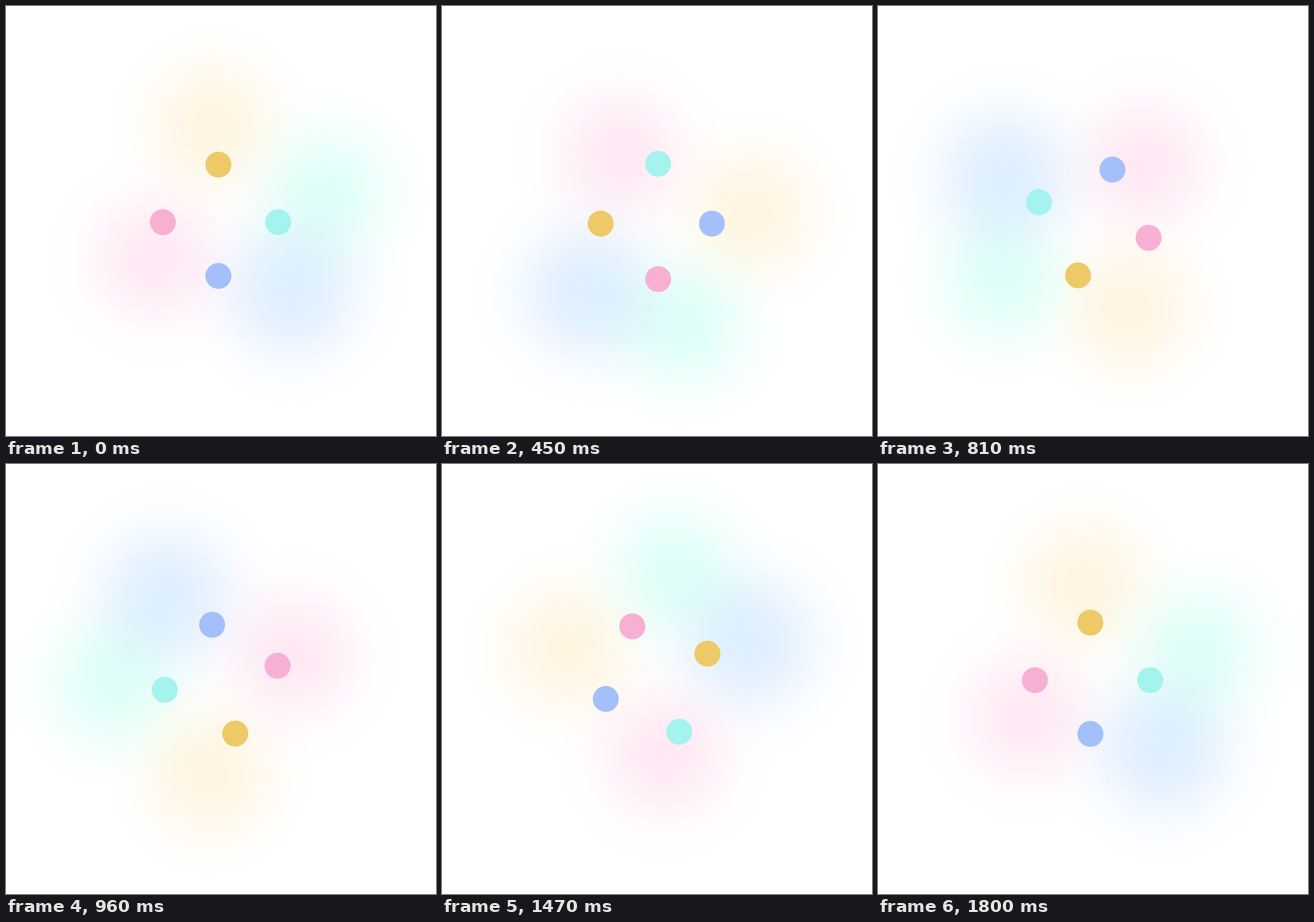
These frames come from a looping animation (744x744 px, 2.4 s). An HTML page with a canvas:

```html
<!DOCTYPE html>
<html lang="en">
<head>
<meta charset="utf-8">
<title>Orbiting dots</title>
<style>
  html, body { margin: 0; width: 100%; height: 100%; overflow: hidden; background: #fff; }
  canvas { display: block; width: 100vw; height: 100vh; }
</style>
</head>
<body>
<canvas width="744" height="744"></canvas>
<script>
const SIZE = 744, LOOP = 2400, TURN = 1800, STEP = 30, REACH = 280;
const ctx = document.querySelector('canvas').getContext('2d');

// Positions are relative to the stage centre.
const glows = [
  { x: -15, y: -165, spread: 108, tint: [255, 245, 225] },
  { x: -114, y: 65, spread: 107, tint: [255, 233, 244] },
  { x: 182, y: -49, spread: 111, tint: [225, 255, 248] },
  { x: 122, y: 122, spread: 115, tint: [224, 239, 255] }
];
const dots = [
  { x: -4.5, y: -97.5, color: '#edc967' },
  { x: 99, y: 2, color: '#a4f3ee' },
  { x: -4.5, y: 95, color: '#a4c0fa' },
  { x: -100.5, y: 2, color: '#f7b0d4' }
];

// A soft bell-shaped fade from the tint to white.
function softGlow({ x, y, spread, tint }) {
  const fill = ctx.createRadialGradient(x, y, 0, x, y, REACH);
  const stops = 28;
  for (let i = 0; i <= stops; i++) {
    const k = i < stops ? Math.exp(-((i / stops * REACH / spread) ** 2.4)) : 0;
    const rgb = tint.map(c => 255 - (255 - c) * k);
    fill.addColorStop(i / stops, `rgb(${rgb})`);
  }
  return fill;
}
const fills = glows.map(softGlow);

function rotated(angle, paint) {
  ctx.save();
  ctx.translate(SIZE / 2, SIZE / 2);
  ctx.rotate(angle);
  paint();
  ctx.restore();
}

function draw(time) {
  const t = Math.min(time % LOOP, TURN);
  const angle = Math.floor(t / STEP) * STEP / TURN * 2 * Math.PI;

  ctx.fillStyle = '#fff';
  ctx.fillRect(0, 0, SIZE, SIZE);

  rotated(angle, () => {
    ctx.globalCompositeOperation = 'multiply';
    for (const fill of fills) {
      ctx.fillStyle = fill;
      ctx.fillRect(-SIZE, -SIZE, 2 * SIZE, 2 * SIZE);
    }
  });

  rotated(-angle, () => {
    for (const { x, y, color } of dots) {
      ctx.fillStyle = color;
      ctx.beginPath();
      ctx.arc(x, y, 22.5, 0, 2 * Math.PI);
      ctx.fill();
    }
  });
}

const start = performance.now();
function tick() {
  draw(performance.now() - start);
  requestAnimationFrame(tick);
}
tick();
</script>
</body>
</html>
```
